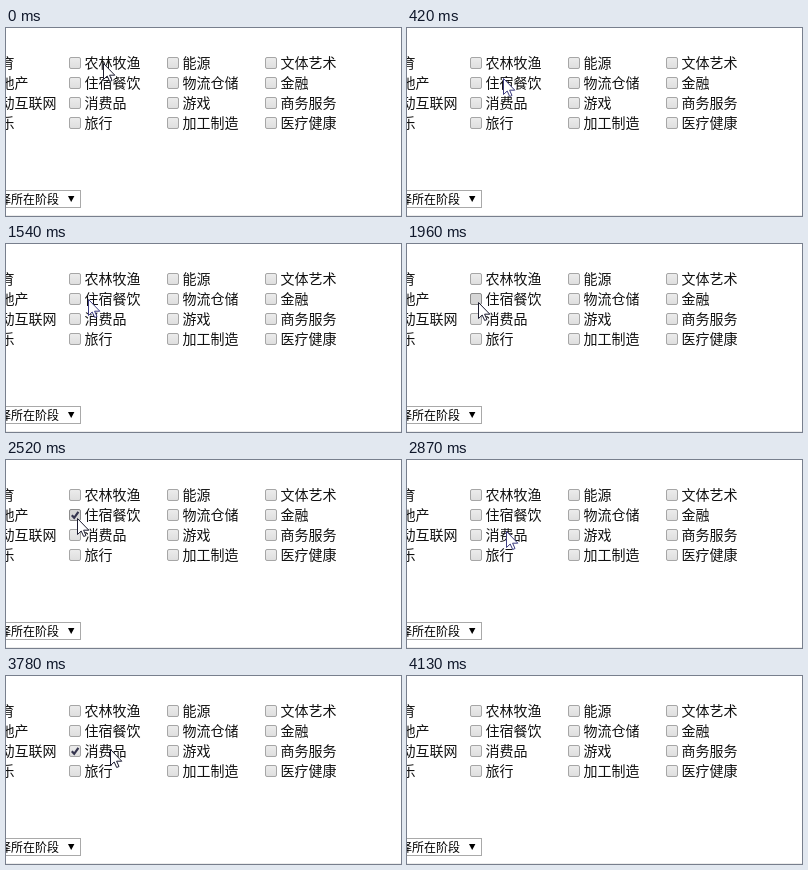
An HTML page that plays this animation: 395 by 188 pixels, repeating every 4480 ms.

```html
<!DOCTYPE html>
<html lang="zh-CN">
<head>
<meta charset="utf-8">
<style>
  html, body { margin: 0; width: 100%; height: 100%; overflow: hidden; background: #fff; }
  svg { display: block; width: 395px; height: 188px; }
  text { font: 14px "Noto Sans CJK SC", "Noto Sans CJK", sans-serif; fill: #111; }
  .select { font-size: 12px; fill: #000; }
</style>
</head>
<body>
<svg viewBox="0 0 395 188">
  <defs>
    <linearGradient id="face" x2="0" y2="1">
      <stop stop-color="#ececec"/><stop offset="1" stop-color="#dedede"/>
    </linearGradient>
  </defs>
  <path d="M0 187.5H395" stroke="#ececec"/>
  <g id="form"></g>
  <rect x="-40.5" y="162.5" width="115" height="17" fill="#fff" stroke="#a9a9a9"/>
  <text class="select" x="53" y="175.5" text-anchor="end">选择所在阶段</text>
  <path d="M62 168h6.4l-3.2 6z"/>
  <path id="cursor" d="M.5 .5V16.5L4.2 13L6.7 18.5L9 17.5L6.6 12.2H11.8Z" fill="#fff"/>
</svg>
<script>
const LOOP = 4480, STEP = 70, PRESS = 2 * STEP;
const COL = 98, ROW = 20;
const labels = [
  '教育 房地产 移动互联网 娱乐',
  '农林牧渔 住宿餐饮 消费品 旅行',
  '能源 物流仓储 游戏 加工制造',
  '文体艺术 金融 商务服务 医疗健康'
].map(column => column.split(' '));

// The pointer rests at each stop; a box is checked from on to off.
const stops = [
  { x: 97, y: 35, arrive: 0, leave: 210 },
  { x: 96, y: 51, arrive: 490, leave: 1400, row: 1, on: 770, off: 1470 },
  { x: 71, y: 58, arrive: 1820, leave: 2660, row: 1, on: 2100, off: 2590 },
  { x: 104, y: 73, arrive: 3010, leave: 3920, row: 2, on: 3290, off: 3990 },
  { x: 120, y: 190, arrive: 4130, leave: LOOP }
];

const form = document.getElementById('form');
const cursor = document.getElementById('cursor');

function add(tag, attrs, text = '') {
  const el = document.createElementNS('http://www.w3.org/2000/svg', tag);
  set(el, attrs);
  el.textContent = text;
  return form.appendChild(el);
}

function set(el, attrs) {
  for (const key in attrs) el.setAttribute(key, attrs[key]);
}

function addOption(label, x, y) {
  add('text', { x: x + 15.5, y: y + 11 }, label);
  const box = add('rect', { x: x + .5, y: y + .5, width: 11, height: 11, rx: 1.5 });
  const mark = add('path', {
    d: `M${x + 2.8} ${y + 6.2}l2.4 2.6l4.2-6`,
    fill: 'none', stroke: '#35354f', 'stroke-width': 2.2
  });
  return (checked, pressed) => {
    set(box, pressed ? { fill: '#d6d6d6', stroke: '#8c8c8c' } : { fill: 'url(#face)', stroke: '#a6a6a6' });
    set(mark, { visibility: checked ? 'visible' : 'hidden' });
  };
}

const options = labels.map((column, c) =>
  column.map((label, r) => addOption(label, 63 + (c - 1) * COL, 29 + r * ROW)));

const within = (t, from, to) => t >= from && t < to;
const easeOut = k => 1 - (1 - k) ** 2;

function pointer(t) {
  const i = stops.findLastIndex(s => t >= s.arrive);
  const a = stops[i], b = stops[i + 1] || a;
  const moving = t > a.leave;
  const k = moving ? easeOut((t - a.leave) / (b.arrive - a.leave)) : 0;
  const mix = axis => Math.round(a[axis] + (b[axis] - a[axis]) * k);
  return { x: mix('x'), y: mix('y'), moving };
}

function render(time) {
  const t = Math.floor(time % LOOP / STEP) * STEP;
  options.forEach((column, c) => column.forEach((draw, r) => {
    const stop = c === 1 && stops.find(s => s.row === r && within(t, s.on - PRESS, s.off));
    draw(stop && t >= stop.on, stop && !within(t, stop.on, stop.off - PRESS));
  }));
  const { x, y, moving } = pointer(t);
  set(cursor, { transform: `translate(${x} ${y})`, stroke: moving ? '#3c3c80' : '#1c1c30' });
}

const start = performance.now();
function tick() {
  render(performance.now() - start);
  requestAnimationFrame(tick);
}
tick();
</script>
</body>
</html>
```
